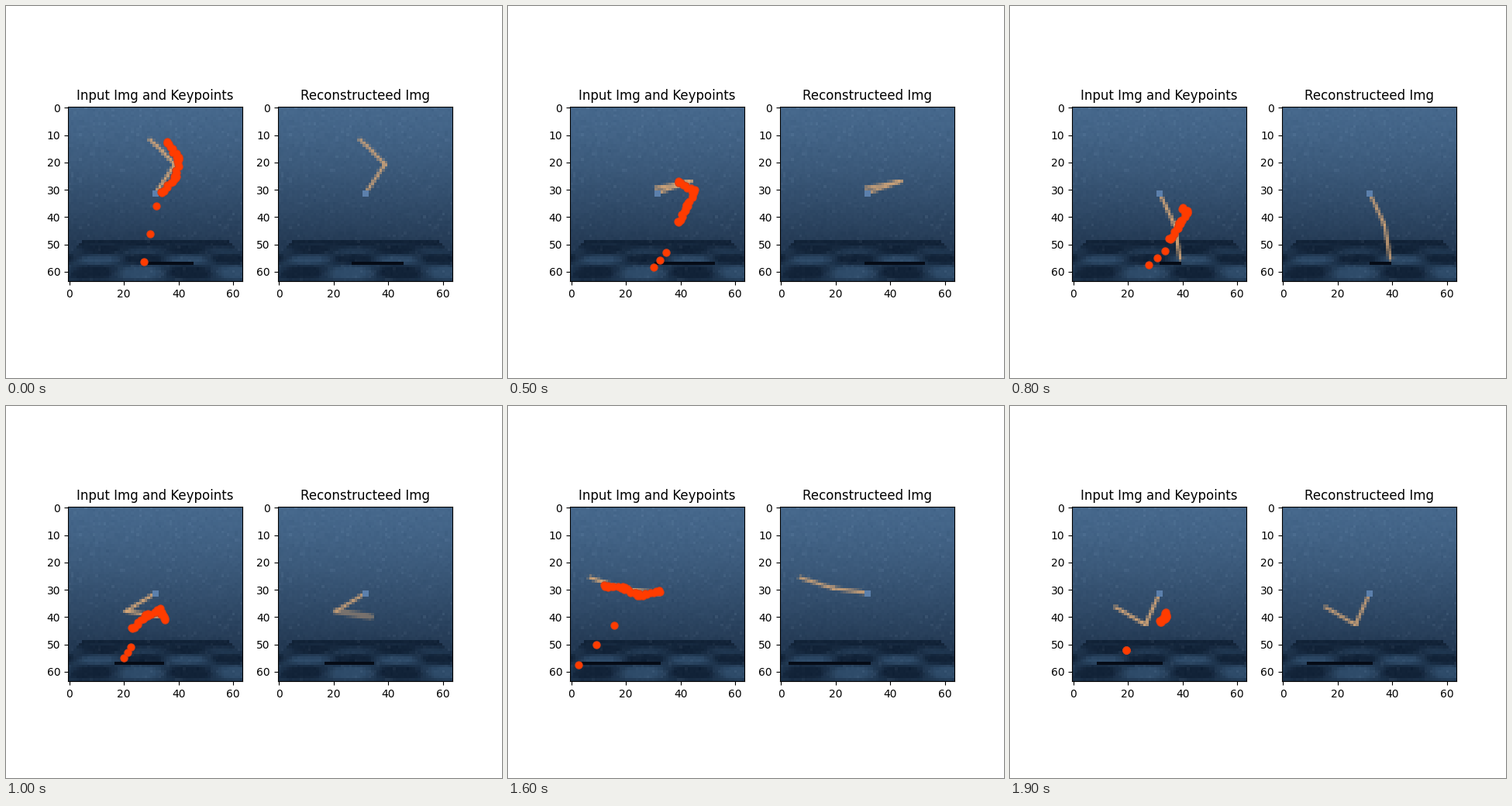
Write a matplotlib script that moves like this. It is 640x480 px and loops after 2 s.

```python
import numpy as np
import matplotlib.pyplot as plt
from matplotlib.animation import FuncAnimation

FRAMES, STEP_MS, SIZE = 20, 100, 64
PIVOT = np.array([31.5, 31.3])
LINK = 12.7
TAN = np.array([212, 166, 120])
DOT_COLOR, RIM_COLOR = "#ff3c00", "#d63c14"

# Key poses: step, then the angle of each link in degrees, clockwise from the right
KEYS = np.array([0, 3, 7, 10, 13, 16, 19])
UPPER = np.array([-56, -44.5, 26.8, 148.5, 215.4, 187.6, 113.7])
LOWER = np.array([-135.5, -161, -238, -351, -250, -162, -149.4])

# Guide line of the keypoints at each key pose: a dense trail of four knots,
# then both ends of a loose tail
GUIDES = np.array([
    [(35.3, 12.5), (40, 18.5), (38.8, 25.5), (34, 30.8), (31.8, 36), (27.4, 56.5)],
    [(35.3, 19.5), (44, 22.5), (40, 28), (37, 33.5), (30.5, 53), (28.8, 58.3)],
    [(42, 35), (46, 38.3), (44.4, 44), (41.7, 49.8), (39, 53), (31.5, 58.6)],
    [(34.6, 41), (33, 37.3), (28, 39.5), (23.2, 44), (22.6, 51), (20, 55)],
    [(31.8, 28.3), (26, 27.2), (25, 32.7), (21.5, 35.3), (19.7, 41), (9.3, 60)],
    [(31.8, 30.8), (24.5, 31.9), (19.8, 29.5), (12.3, 28.5), (15.7, 43), (2.7, 57.5)],
    [(33.3, 38.7), (33.7, 39.7), (33.5, 40.3), (32, 41.5), (19.5, 52), (19.5, 52)],
])

rng = np.random.default_rng(4)
TRAIL = np.linspace(0, 3, 34)
TRAIL -= 0.11 * np.sin(2 * np.pi * TRAIL)      # gather dots around the knots
JITTER = rng.uniform(-0.55, 0.55, (TRAIL.size, 2))
SPOTS = np.concatenate([TRAIL, [4, 4.5, 5]])
YY, XX = np.mgrid[0:SIZE, 0:SIZE].astype(float)


def segment(k):
    """Index of the key span holding step k and the fraction within it."""
    i = min(np.searchsorted(KEYS, k, side="right") - 1, len(KEYS) - 2)
    return i, (k - KEYS[i]) / (KEYS[i + 1] - KEYS[i])


def smooth(values, k):
    """Cubic Hermite curve through the key values."""
    i, u = segment(k)
    h = KEYS[i + 1] - KEYS[i]
    m = np.gradient(values, KEYS)
    return ((2 * u**3 - 3 * u**2 + 1) * values[i]
            + (u**3 - 2 * u**2 + u) * h * m[i]
            + (3 * u**2 - 2 * u**3) * values[i + 1]
            + (u**3 - u**2) * h * m[i + 1])


def blend(a, b, t):
    return a + (np.asarray(b) - a) * t[..., None]


def make_scene():
    """Starry blue gradient above a dark, softly checkered floor."""
    fall = np.clip(YY / 50, 0, 1) ** 1.4
    img = blend(np.array([70, 104, 140]), (36, 58, 84), fall)
    grain = rng.normal(0, 1.5, (SIZE, SIZE)) + 7 * (rng.random((SIZE, SIZE)) < 0.04)

    column = (XX - 35) / (16 + (YY - 55) / 3)
    row = np.interp(YY + 0.5, [49, 51, 54, 58, 64], [0, 1, 2, 3, 4])
    checker = np.sin(np.pi * column) * np.sin(np.pi * row)
    light = np.clip(0.45 + 0.9 * checker, 0, 1) * np.clip((YY - 49) / 7, 0, 1)
    tiles = blend(np.array([18, 35, 56]), (47, 76, 106), light)

    inset = np.clip(5 - (YY - 49) * 1.3, 0, 5)
    floor = (YY >= 49) & (XX >= inset) & (XX <= 63 - inset)
    img[floor] = tiles[floor]
    return img + grain[..., None]


SCENE = make_scene()


def joints(k):
    """Positions of the elbow and the tip at step k."""
    arm = []
    p = PIVOT
    for angles in (UPPER, LOWER):
        a = np.radians(smooth(angles, k))
        p = p + LINK * np.array([np.cos(a), np.sin(a)])
        arm.append(p)
    return arm


def draw_link(img, p, q, width, alpha):
    d = q - p
    u = np.clip(((XX - p[0]) * d[0] + (YY - p[1]) * d[1]) / (d @ d), 0, 1)
    dist = np.hypot(XX - p[0] - u * d[0], YY - p[1] - u * d[1])
    img[:] = blend(img, TAN, alpha * np.clip(width - dist, 0, 1))


def render(k, blurred):
    img = SCENE.copy()
    elbow, tip = joints(k)

    # Shadow on the floor: the higher the joint, the wider the throw
    cast = [31.5 + (x - 31.5) / (0.25 + 0.0128 * y) for x, y in (PIVOT, elbow, tip)]
    left, right = np.clip([min(cast), max(cast + [32.4])], 3, 62).round().astype(int)
    img[57, left:right + 1] = (5, 11, 22)

    # The reconstruction smears the lower link at its turning point
    smear = np.exp(-((k - 10) / 1.2) ** 2) if blurred else 0
    fade = 0.85 if blurred else 0.93
    draw_link(img, elbow, tip, 1.12 + 0.5 * smear, fade - 0.4 * smear)
    draw_link(img, PIVOT, elbow, 1.12, fade)
    img[31:33, 31:33] = (92, 128, 172)
    return np.clip(img, 0, 255).astype(np.uint8)


def keypoints(k):
    i, u = segment(k)
    guide = GUIDES[i] * (1 - u) + GUIDES[i + 1] * u
    knots = np.arange(len(guide))
    dots = np.stack([np.interp(SPOTS, knots, c) for c in guide.T], axis=1)
    dots[:TRAIL.size] += JITTER
    return dots


fig, axes = plt.subplots(1, 2, figsize=(6.4, 4.8), dpi=100)
images = []
for ax, title in zip(axes, ("Input Img and Keypoints", "Reconstructeed Img")):
    images.append(ax.imshow(render(0, ax is axes[1]), interpolation="nearest"))
    ax.set_title(title)

# A darker rim under bright cores
layers = [axes[0].scatter(*keypoints(0).T, s=size, color=color, linewidths=0)
          for size, color in ((57, RIM_COLOR), (36, DOT_COLOR))]
axes[0].set(xlim=(-0.5, 63.5), ylim=(63.5, -0.5))


def update(k):
    for i, im in enumerate(images):
        im.set_data(render(k, i == 1))
    for layer in layers:
        layer.set_offsets(keypoints(k))
    return [*images, *layers]


anim = FuncAnimation(fig, update, frames=FRAMES, interval=STEP_MS, repeat=True,
                     repeat_delay=0)
plt.show()
```
